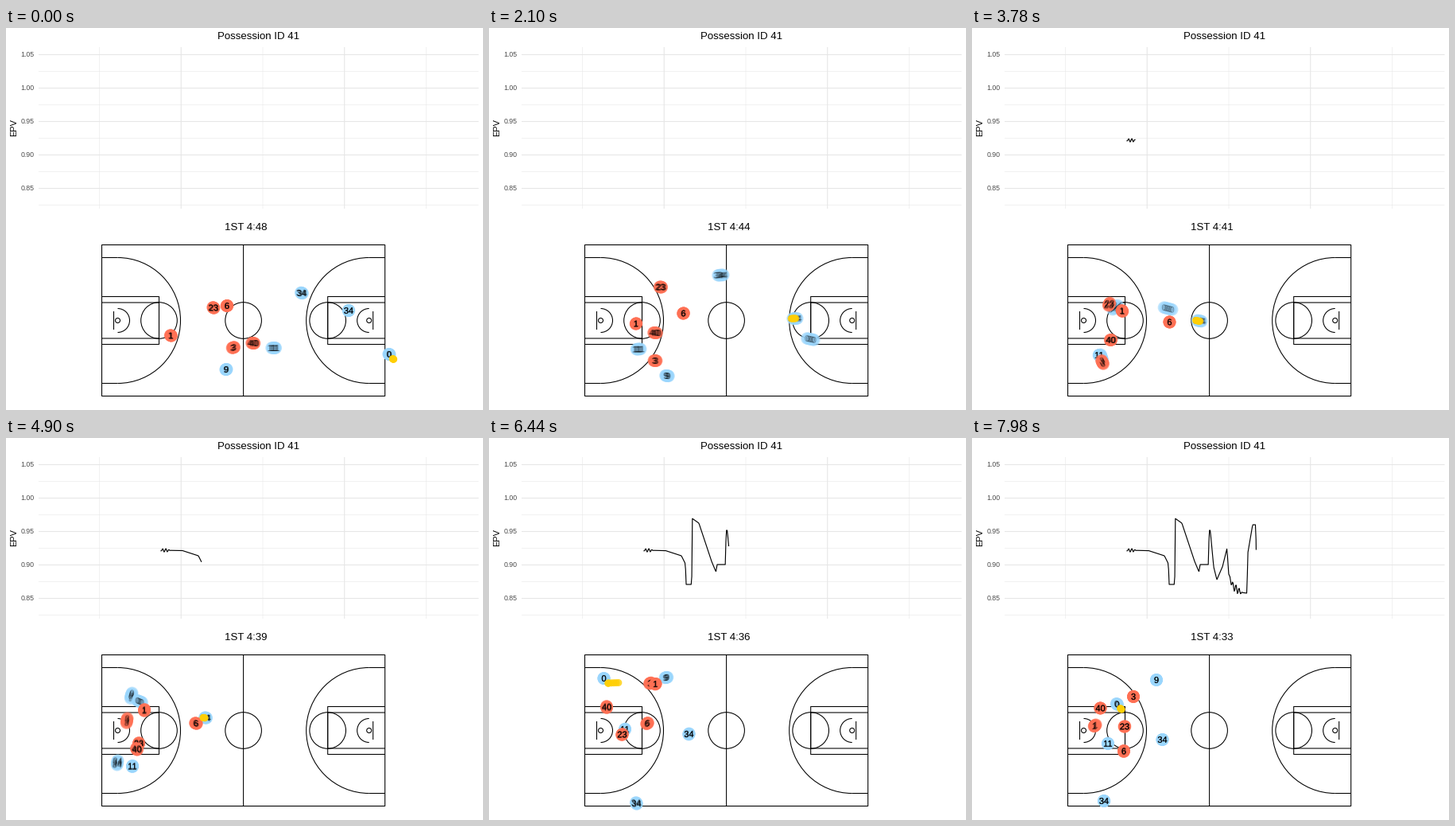
A matplotlib script for the animation above (8000 ms loop, 600 px wide and 480 px high).

```python
import numpy as np
import matplotlib.pyplot as plt
from matplotlib.animation import FuncAnimation
from matplotlib.collections import LineCollection, PathCollection
from matplotlib.patches import Arc, Circle, Rectangle
from matplotlib.path import Path
from matplotlib.textpath import TextPath

W, H, DPI = 600, 480, 100
PX = 72 / DPI                       # points per pixel
FONT = "Liberation Sans"
TICK_MS, STEP_MS, LOOP_MS = 20, 140, 8000
BLUE, RED, GOLD = "#9ad6fd", "#ff7054", "#ffcf05"

plt.rcParams["path.snap"] = False
fig = plt.figure(figsize=(W / DPI, H / DPI), dpi=DPI, facecolor="white")
ax = fig.add_axes([0, 0, 1, 1])
ax.set(xlim=(0, W), ylim=(H, 0))
ax.axis("off")


def label(x, y, text, size, color="black", **kw):
    kw = {"ha": "center", "va": "center_baseline", **kw}
    return ax.text(x, y, text, fontsize=size * PX, family=FONT, color=color, **kw)


def lines(segments, width, color="black", z=1):
    ax.add_collection(LineCollection(segments, linewidths=width * PX,
                                     colors=color, zorder=z), autolim=False)


# chart panel
def grid(xs, ys, width):
    lines([[(x, 24), (x, 227)] for x in xs] +
          [[(41, y), (594.5, y)] for y in ys], width, "#e6e6e6")


ROWS = 33.5 + 42 * np.arange(5)
COLS = 117.5 + 102.75 * np.arange(5)
grid(COLS[::2], ROWS + 21, 0.55)
grid(COLS[1::2], ROWS, 1.07)
for i, y in enumerate(ROWS):
    label(35.3, y - 0.5, f"{1.05 - 0.05 * i:.2f}", 8.8, "#4d4d4d", ha="right")
label(317.3, 10, "Possession ID 41", 13.2)
label(10, 124.5, "EPV", 11, rotation=90, va="center")
clock = label(301.5, 250, "", 13.2)

# court
MID_X, MID_Y = 298.6, 367.5


def outline(shape):
    shape.set(fill=False, edgecolor="black", linewidth=1.07 * PX, zorder=2)
    ax.add_patch(shape)


def half_court(side):
    def fx(d):                      # distance from the baseline to x
        return MID_X + side * (178.1 - d)

    turn = 90 if side > 0 else -90
    for half in (30, 22.5):
        lines([[(fx(0), MID_Y - half), (fx(72), MID_Y - half),
                (fx(72), MID_Y + half), (fx(0), MID_Y + half)]], 1.07, z=2)
    lines([[(fx(0), MID_Y + s * 79), (fx(20), MID_Y + s * 79)] for s in (-1, 1)] +
          [[(fx(15), MID_Y - 11.5), (fx(15), MID_Y + 11.5)]], 1.07, z=2)
    outline(Circle((fx(72), MID_Y), 22.8))
    outline(Circle((fx(20), MID_Y), 3))
    for r in (15, 79):
        outline(Arc((fx(20), MID_Y), 2 * r, 2 * r, theta1=turn, theta2=turn + 180))


outline(Rectangle((120.5, 272.5), 356.2, 190))
outline(Circle((MID_X, MID_Y), 22.8))
lines([[(MID_X, 272.5), (MID_X, 462.5)]], 1.07, z=2)
half_court(-1)
half_court(1)

# expected value: turning points in pixels, one sample per game tick
TURNS = np.array([
    (195, 141), (222, 141.5), (242, 148), (247, 158), (248, 184), (255, 184),
    (255.5, 101), (264, 107), (280, 155), (285.4, 168), (287, 159), (297.5, 159),
    (298.2, 116), (299.7, 116), (304, 162), (308, 178), (315, 162), (320.7, 139),
    (323, 172), (328, 186), (338, 194), (346, 195), (346.7, 146), (353, 109),
    (357, 109), (357.4, 140)])
trace, = ax.plot([], [], color="black", lw=1.15 * PX, zorder=3)


def value(x):
    def ripple(center, reach, size):
        return size * np.exp(-((x - center) / reach) ** 4) * np.sin(np.pi / 2 * (x - center + 2))

    return np.interp(x, *TURNS.T) + ripple(200, 5, 2.2) + ripple(331, 7, 5)


# players run smoothly through one waypoint per key step
STEPS = np.array([0, 9, 15, 27, 35, 46, 57])
GHOSTS = np.linspace(-0.45, 0.45, 7)     # game ticks shown together


def number_path(text):
    p = TextPath((0, 0), text, size=11, prop={"family": FONT})
    box = p.get_extents()
    v = (p.vertices - [(box.x0 + box.x1) / 2, (box.y0 + box.y1) / 2]) * [1, -1]
    return Path(v, p.codes)


class Stamp:
    """A shape repeated at several spots."""

    def __init__(self, shape, color, z, alpha):
        self.shape = shape
        self.coll = PathCollection([shape], facecolors=color, linewidths=0,
                                   alpha=alpha, zorder=z)
        ax.add_collection(self.coll, autolim=False)

    def put(self, spots):
        self.coll.set_paths([Path(self.shape.vertices + p, self.shape.codes)
                             for p in spots])


class Player:
    def __init__(self, number, color, z, *way):
        self.way = np.array(way, float)
        self.speed = np.gradient(self.way, STEPS, axis=0)
        self.speed[[0, -1]] *= 0.5
        self.disc = Stamp(Path.circle((0, 0), 7.8), color, z, 0.6)
        self.text = Stamp(number_path(number), "black", z + 0.5, 0.35)

    def at(self, t):
        """Cubic Hermite curve."""
        i = np.clip(np.searchsorted(STEPS, t, "right") - 1, 0, len(STEPS) - 2)
        gap = (STEPS[i + 1] - STEPS[i])[:, None]
        s = (t - STEPS[i])[:, None] / gap
        ease = s * s * (3 - 2 * s)
        return (self.way[i] * (1 - ease) + self.way[i + 1] * ease
                + gap * s * (s - 1) * ((s - 1) * self.speed[i] + s * self.speed[i + 1]))

    def move(self, step):
        spots = self.at(step + GHOSTS)
        self.disc.put(spots)
        self.text.put(spots)


wing = Player("9", BLUE, 10, (277, 429), (248, 438), (224, 437), (163, 414),
              (157.5, 323.5), (223, 301), (232, 304))
cutter = Player("34", BLUE, 11, (372, 333), (329.5, 316.5), (291.5, 310.5),
                (180, 351), (140, 408), (185.5, 459), (166, 456))
guard = Player("34", BLUE, 12, (431, 355), (416, 364), (385, 365), (286, 368),
               (251, 351.5), (251.5, 372), (239.5, 379))
passer = Player("0", BLUE, 13, (482, 410), (453.5, 400), (404.5, 391),
                (246.5, 352.5), (168, 331), (144.5, 302), (182.5, 334.5))
post = Player("11", BLUE, 14, (337, 402), (234, 402.5), (188, 403.5), (160, 411),
              (159, 412.5), (171, 366), (171, 384))
defence = [
    Player("23", RED, 15, (261, 351.5), (231.5, 333), (216, 325.5), (172.5, 347),
           (167, 384), (167.5, 372.5), (192, 362.5)),
    Player("6", RED, 16, (278, 349), (256, 356), (244.5, 358.5), (248.5, 369.5),
           (239, 358.5), (199, 358.5), (191, 393.5)),
    Player("3", RED, 17, (286, 401.5), (231, 419.5), (209, 418), (164, 420),
           (152, 355), (203, 308), (203, 325)),
    Player("40", RED, 18, (311, 396), (241.5, 389.5), (209, 383), (174.5, 392),
           (164.5, 391), (148, 338), (161.5, 339.5)),
    Player("1", RED, 19, (207.5, 386.5), (179, 374), (185, 371.5), (189, 355.5),
           (174, 342), (209.5, 309), (154.5, 361.5)),
]
players = [wing, cutter, guard, passer, post, *defence]

# the ball stays beside its holder and flies straight on each pass
ball = Stamp(Path.circle((0, 0), 4.5), GOLD, 20, 0.8)
BESIDE = {passer: (5, 6), guard: (-2, 0), wing: (-5, 4)}
PASSES = [(0.5, 8, guard), (35.5, 37, wing), (43, 46.2, passer)]


def ball_at(t):
    spot = passer.at(t) + BESIDE[passer]
    for start, end, catcher in PASSES:
        share = np.clip((t - start) / (end - start), 0, 1)[:, None]
        spot = spot + share * (catcher.at(t) + BESIDE[catcher] - spot)
    return spot


def update(i):
    step = i * TICK_MS // STEP_MS
    left = int(288.2 - 0.26 * step)
    clock.set_text(f"1ST {left // 60}:{left % 60:02d}")
    tip = 205 + 5.08 * (step - 27)
    xs = np.append(np.arange(195, tip, 0.78), tip) if tip > 195 else np.array([])
    trace.set_data(xs, value(xs))
    for p in players:
        p.move(step)
    ball.put(ball_at(step + GHOSTS))


anim = FuncAnimation(fig, update, frames=LOOP_MS // TICK_MS, interval=TICK_MS,
                     repeat=True, repeat_delay=0)
plt.show()
```
